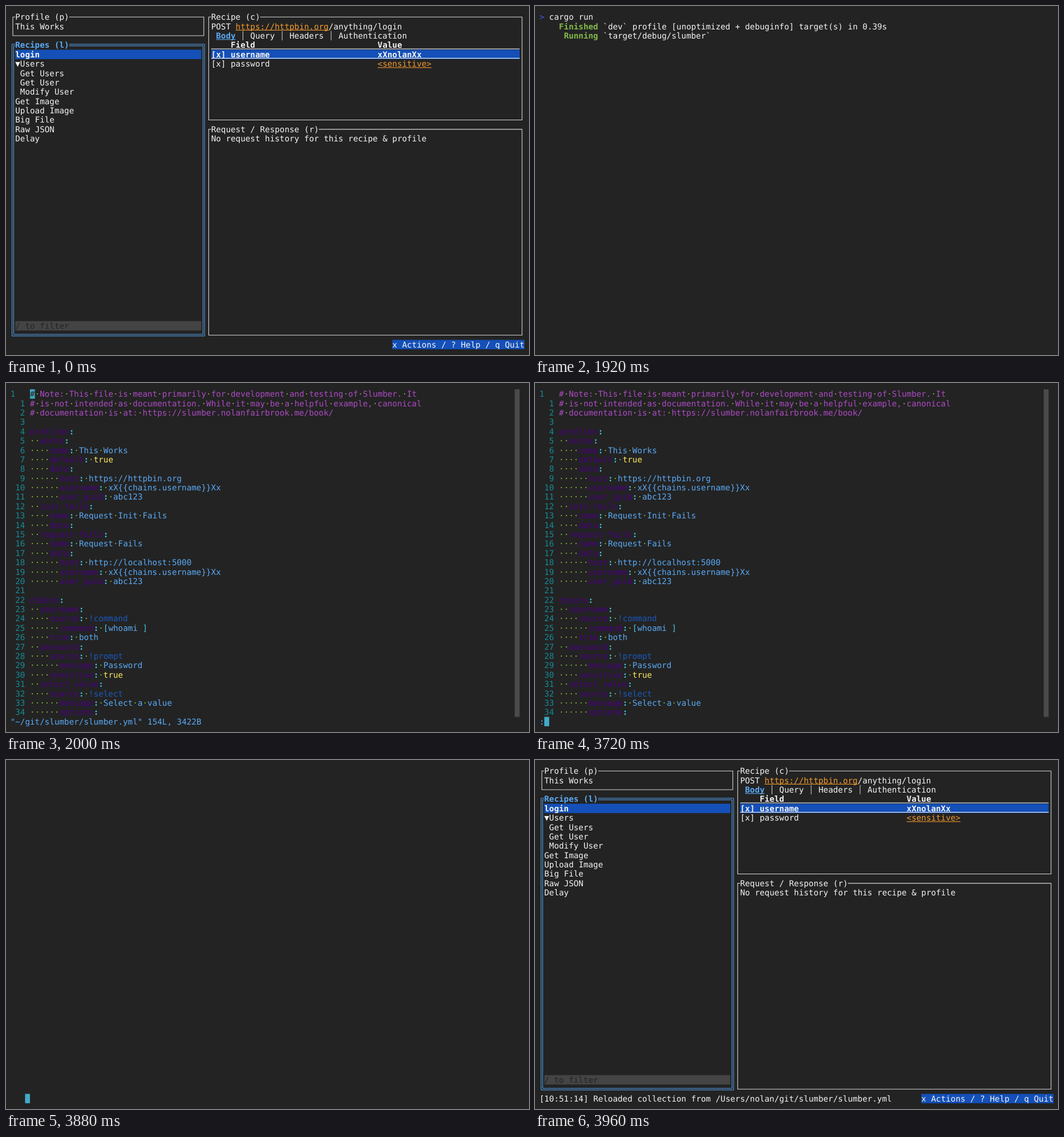
Animation, 917 px wide and 611 px high, one loop 4.84 s. Source, as an HTML page:

```html
<!DOCTYPE html>
<html lang="en">
<head>
<meta charset="utf-8">
<title>Terminal session</title>
<style>
html, body { margin: 0; width: 100%; height: 100%; overflow: hidden; background: #232323; }
svg { display: block; width: 917px; height: 611px; }
text { font: 14.26px "DejaVu Sans Mono", monospace; text-rendering: geometricPrecision; }
.b { font-weight: bold; }
</style>
</head>
<body>
<svg id="stage" viewBox="0 0 917 611"></svg>
<script>
const C = {
  bg: '#232323', fg: '#f4f4f4', line: '#d8d8d8', blue: '#5aaaf5', sel: '#1450b8',
  link: '#f39a2d', bar: '#444444', green: '#82bb48', prompt: '#4a55e0', num: '#168a94',
  comment: '#ad4bc4', dot: '#86b53c', key: '#4b0082', colon: '#45c8d8', yes: '#ffe95c',
  tag: '#1a58bd', cursor: '#42aac8', scroll: '#4b4b4b'
};
const CW = 8.585, RH = 16.386;
const X = col => 7.7 + col * CW;
const Y = row => 11 + row * RH;
const stage = document.getElementById('stage');

function add(parent, tag, attrs) {
  const el = document.createElementNS('http://www.w3.org/2000/svg', tag);
  for (const k in attrs) el.setAttribute(k, attrs[k]);
  parent.appendChild(el);
  return el;
}

const group = () => add(stage, 'g', { display: 'none' });

// Every word starts on the character grid.
function text(g, col, row, str, fill = C.fg, cls = '') {
  for (const m of str.matchAll(/\S+/g)) {
    add(g, 'text', { x: X(col + m.index), y: Y(row) + 13.2, fill, class: cls }).textContent = m[0];
  }
}

function fillCells(g, col, row, cols, rows, fill) {
  add(g, 'rect', { x: X(col), y: Y(row), width: cols * CW, height: rows * RH, fill });
}

function underline(g, col, row, cols, fill) {
  add(g, 'rect', { x: X(col), y: Y(row) + 14.4, width: cols * CW, height: 1.1, fill });
}

// Border through cell centres, with a gap for the title.
function box(g, c0, r0, c1, r1, title, color, double, cls) {
  for (const d of double ? [-1.4, 1.4] : [0]) {
    const l = X(c0 + .5) + d, r = X(c1 + .5) - d;
    const t = Y(r0 + .5) + d, b = Y(r1 + .5) - d;
    add(g, 'path', {
      d: `M${X(c0 + 1 + title.length)} ${t}H${r}V${b}H${l}V${t}H${X(c0 + 1)}`,
      fill: 'none', stroke: color, 'stroke-width': double ? 1 : 1.1
    });
  }
  text(g, c0 + 1, r0, title, cls ? color : C.fg, cls);
}

function buildApp() {
  const g = group();
  box(g, 0, 0, 39, 2, 'Profile (p)', C.line);
  text(g, 1, 1, 'This Works');

  box(g, 0, 3, 39, 34, 'Recipes (l)', C.blue, true, 'b');
  fillCells(g, 1, 4, 38, 1, C.sel);
  text(g, 1, 4, 'login', C.fg, 'b');
  ['▼Users', ' Get Users', ' Get User', ' Modify User', 'Get Image',
    'Upload Image', 'Big File', 'Raw JSON', 'Delay'].forEach((s, i) => text(g, 1, 5 + i, s));
  fillCells(g, 1, 33, 38, 1, C.bar);
  text(g, 1, 33, '/ to filter', C.bg);

  box(g, 40, 0, 104, 11, 'Recipe (c)', C.line);
  text(g, 41, 1, 'POST');
  text(g, 46, 1, 'https://httpbin.org', C.link);
  underline(g, 46, 1, 19, C.link);
  text(g, 65, 1, '/anything/login');
  text(g, 42, 2, 'Body', C.blue, 'b');
  underline(g, 42, 2, 4, C.blue);
  text(g, 49, 2, 'Query   Headers   Authentication');
  for (const c of [47, 55, 65]) {
    add(g, 'rect', { x: X(c + .5) - .5, y: Y(2), width: 1, height: RH, fill: C.line });
  }
  text(g, 45, 3, 'Field', C.fg, 'b');
  text(g, 75, 3, 'Value', C.fg, 'b');
  fillCells(g, 41, 4, 63, 1, C.sel);
  underline(g, 41, 3, 63, C.fg);
  underline(g, 41, 4, 63, C.fg);
  text(g, 41, 4, '[x] username', C.fg, 'b');
  text(g, 75, 4, 'xXnolanXx', C.fg, 'b');
  text(g, 41, 5, '[x] password');
  text(g, 75, 5, '<sensitive>', C.link);
  underline(g, 75, 5, 11, C.link);

  box(g, 40, 12, 104, 34, 'Request / Response (r)', C.line);
  text(g, 41, 13, 'No request history for this recipe & profile');
  fillCells(g, 78, 35, 27, 1, C.sel);
  text(g, 78, 35, 'x Actions / ? Help / q Quit');
  return g;
}

function buildMenu() {
  const g = group();
  fillCells(g, 35, 15, 34, 5, C.bg);
  box(g, 35, 15, 68, 19, 'Actions', C.line, true);
  fillCells(g, 37, 16, 30, 1, C.sel);
  text(g, 37, 16, 'Edit Collection', C.fg, 'b');
  text(g, 37, 17, 'Copy URL');
  text(g, 37, 18, 'Copy as cURL');
  return g;
}

function buildShell() {
  const g = group();
  text(g, 0, 0, '>', C.prompt);
  text(g, 2, 0, 'cargo run');
  text(g, 4, 1, 'Finished', C.green, 'b');
  text(g, 13, 1, '`dev` profile [unoptimized + debuginfo] target(s) in 0.39s');
  text(g, 5, 2, 'Running', C.green, 'b');
  text(g, 13, 2, '`target/debug/slumber`');
  return g;
}

const source = `# Note: This file is meant primarily for development and testing of Slumber. It
# is not intended as documentation. While it may be a helpful example, canonical
# documentation is at: https://slumber.nolanfairbrook.me/book/

profiles:
  works:
    name: This Works
    default: true
    data:
      host: https://httpbin.org
      username: xX{{chains.username}}Xx
      user_guid: abc123
  init-fails:
    name: Request Init Fails
    data:
  request-fails:
    name: Request Fails
    data:
      host: http://localhost:5000
      username: xX{{chains.username}}Xx
      user_guid: abc123

chains:
  username:
    source: !command
      command: [whoami]
    trim: both
  password:
    source: !prompt
      message: Password
    sensitive: true
  select_value:
    source: !select
      message: Select a value
      options:`.split('\n');

function valueColor(v) {
  if (v.startsWith(' !')) return C.tag;
  return v === ' true' ? C.yes : C.blue;
}

function codeLine(g, row, str) {
  for (const m of str.matchAll(/ /g)) text(g, 4 + m.index, row, '·', C.dot);
  if (str[0] === '#') return text(g, 4, row, str, C.comment);
  const m = str.match(/^( *)([\w-]+):(.*)$/);
  if (!m) return;
  const at = 4 + m[1].length, end = at + m[2].length, value = m[3];
  text(g, at, row, m[2], C.key);
  text(g, end, row, ':', C.colon, 'b');
  if (value.startsWith(' [')) {
    text(g, end + 2, row, '[', C.colon);
    text(g, end + 3, row, value.slice(2, -1), C.blue);
    text(g, end + 1 + value.length, row, ']', C.colon);
  } else {
    text(g, end + 1, row, value, valueColor(value));
  }
}

function buildEditor() {
  const g = group();
  source.forEach((str, row) => {
    text(g, row ? 1 : 0, row, row ? String(row).padStart(2) : '1', C.num);
    codeLine(g, row, str);
  });
  fillCells(g, 103, 0, 1, 35, C.scroll);
  return g;
}

function buildStatus(str) {
  const g = group();
  text(g, 0, 35, str, C.blue);
  return g;
}

function buildCursor(col, row, char = '') {
  const g = group();
  fillCells(g, col, row, 1, 1, C.cursor);
  text(g, col, row, char, C.bg);
  return g;
}

const fileInfo = '"~/git/slumber/slumber.yml" 154L, 3422B';
const part = {
  app: buildApp(),
  menu: buildMenu(),
  shell: buildShell(),
  editor: buildEditor(),
  opened: buildStatus(fileInfo),
  written: buildStatus(fileInfo + ' written'),
  cmd0: buildStatus(':'),
  cmd1: buildStatus(':w'),
  cmd2: buildStatus(':wq'),
  cur0: buildCursor(4, 0, '#'),
  cur1: buildCursor(1, 35),
  cur2: buildCursor(2, 35),
  cur3: buildCursor(3, 35),
  notice: group()
};
text(part.notice, 0, 35, '[10:51:14] Reloaded collection from /Users/nolan/git/slumber/slumber.yml');

const LOOP = 4840;
const steps = [
  [0, 'app'],
  [920, 'app menu'],
  [1920, 'shell'],
  [1960, 'opened'],
  [2000, 'editor opened cur0'],
  [3720, 'editor cmd0 cur1'],
  [3760, 'editor cmd1 cur2'],
  [3800, 'editor cmd2 cur3'],
  [3840, 'editor written'],
  [3880, 'cur3'],
  [3920, 'shell'],
  [3960, 'app notice']
];

function update(t) {
  const visible = steps.filter(s => s[0] <= t).pop()[1].split(' ');
  for (const name in part) {
    part[name].setAttribute('display', visible.includes(name) ? 'inline' : 'none');
  }
}

const start = performance.now();
function tick() {
  update((performance.now() - start) % LOOP);
  requestAnimationFrame(tick);
}
tick();
</script>
</body>
</html>
```
